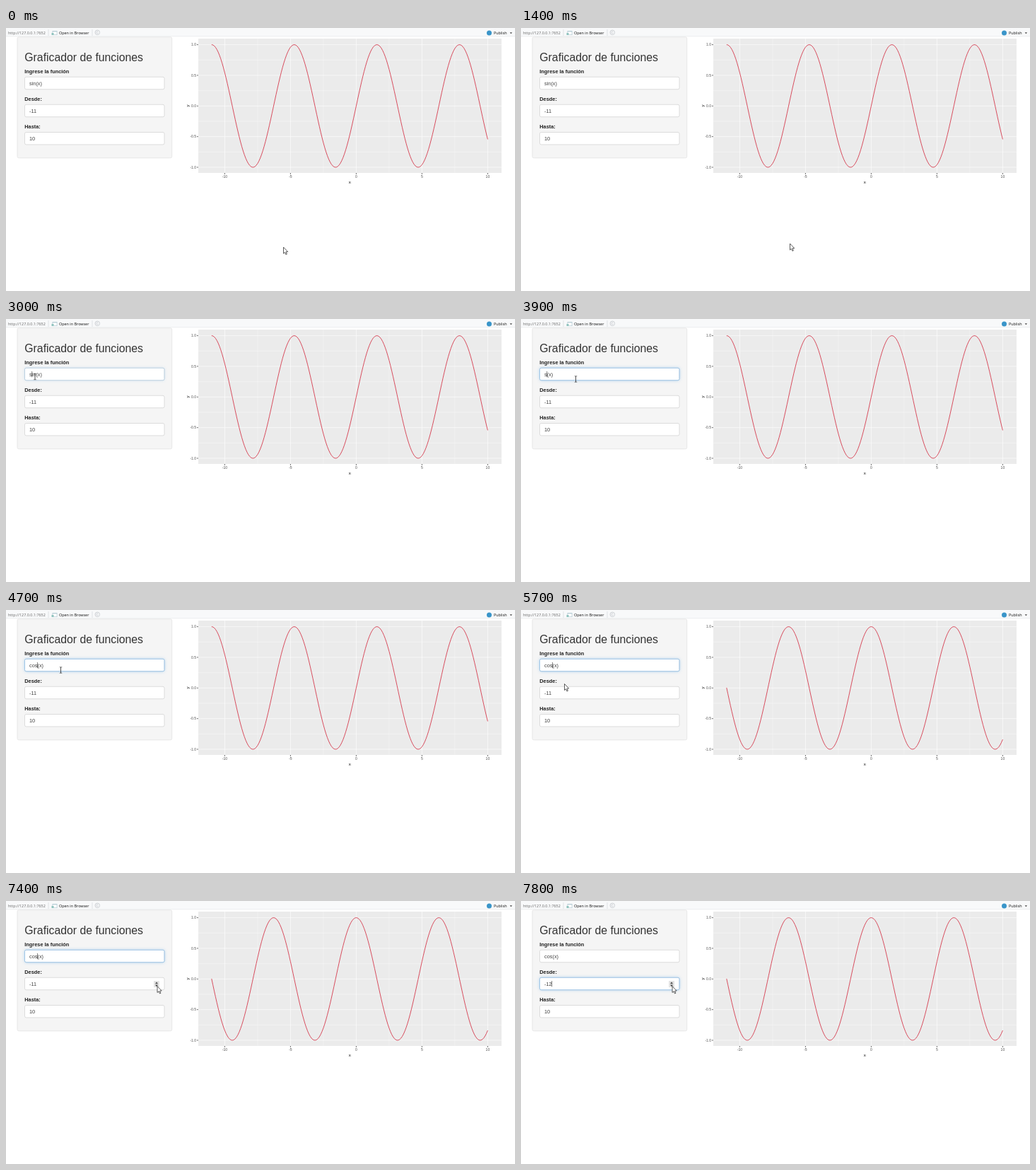
An HTML page with a canvas that plays this animation: 720 by 372 pixels, repeating every 8 s.

```html
<!DOCTYPE html>
<html lang="es">
<head>
<meta charset="utf-8">
<title>Graficador de funciones</title>
<style>
html, body { margin: 0; width: 100%; height: 100%; overflow: hidden; background: #fff; }
canvas { display: block; }
</style>
</head>
<body>
<canvas id="stage" width="720" height="372"></canvas>
<script>
const c = document.getElementById('stage').getContext('2d');
const LOOP = 8000, STEP = 100, BLINK = 530;
const ARIAL = '"Liberation Sans", Arial, sans-serif';
const UI = '"Open Sans", "Noto Sans", sans-serif';
const FIELDS = [69, 108, 147.2], BOX = { x: 26.5, w: 197.5, h: 18 };

// time, formula, caret index
const typing = [
  [0, 'sin(x)', 0], [2870, 'sin(x)', 1], [3880, 's(x)', 1],
  [3980, '(x)', 0], [4080, 'c(x)', 1], [4210, 'cos(x)', 3]
];
// time, x, y, ease-out power for the way here (smooth if none)
const path = [
  [0, 392.5, 310], [1300, 392.5, 310], [2100, 113, 193], [2200, 105.5, 187, 1],
  [2700, 41, 81.5, 2.5], [3200, 41, 81.5], [3400, 77.5, 85], [5600, 77.5, 85],
  [5700, 61.5, 104.5], [5800, 56, 124], [6000, 56, 124], [6400, 58, 124],
  [6500, 58, 124], [7400, 214, 120.5], [LOOP, 214, 120.5]
];

const clamp = v => Math.max(0, Math.min(1, v));
const mix = (a, b, p) => a + (b - a) * p;

function rect(x, y, w, h, color) {
  c.fillStyle = color;
  c.fillRect(x, y, w, h);
}
function line(x1, y1, x2, y2, color, width) {
  c.strokeStyle = color;
  c.lineWidth = width;
  c.beginPath();
  c.moveTo(x1, y1);
  c.lineTo(x2, y2);
  c.stroke();
}
function shape(points, color) {
  c.beginPath();
  points.forEach(([x, y]) => c.lineTo(x, y));
  c.closePath();
  c.fillStyle = color;
  c.fill();
}
function disc(x, y, r, color) {
  c.beginPath();
  c.arc(x, y, r, 0, 7);
  c.fillStyle = color;
  c.fill();
}
function text(str, x, y, font, color, align = 'left') {
  c.font = font;
  c.fillStyle = color;
  c.textAlign = align;
  c.fillText(str, x, y);
}

function toolbar() {
  const font = '5.45px ' + UI;
  rect(0, 0, 720, 12, '#f8f9fa');
  rect(0, 11.5, 720, 0.7, '#e8eaec');
  text('http://127.0.0.1:7652', 3, 8.7, font, '#666');
  text('Open in Browser', 75, 9.3, font, '#111');
  text('Publish', 690, 9.3, font, '#111');
  for (const x of [60, 122]) line(x, 2, x, 11, '#d5d8db', 0.7);
  rect(65.5, 4, 7, 6, '#b5ccd4');
  rect(66.3, 5.3, 5.4, 4, '#fff');
  rect(64.5, 7, 3, 3, '#8fc3bd');
  c.beginPath();
  c.arc(129.3, 6.3, 3.3, 0, 7);
  c.strokeStyle = '#c3c7cc';
  c.lineWidth = 0.8;
  c.stroke();
  c.beginPath();
  c.arc(129.3, 6.3, 1.5, 0.5, 5.5);
  c.stroke();
  disc(683.5, 7, 3.5, '#3a95c9');
  shape([[712.7, 6.3], [716, 6.3], [714.35, 8.2]], '#444');
}

function plot(f) {
  const px = x => 495.4 + 18.6 * x, py = y => 110.3 - 86.7 * y;
  const L = 272, R = 701, T = 15, B = 205, font = '5px ' + ARIAL;
  rect(L, T, R - L, B - T, '#ebebeb');
  for (let x = -10; x <= 10; x += 2.5) {
    const major = x % 5 === 0;
    line(px(x), T, px(x), B, '#fff', major ? 0.6 : 0.35);
    if (!major) continue;
    line(px(x), B, px(x), B + 2, '#333', 0.7);
    text(x, px(x), 212.3, font, '#4d4d4d', 'center');
  }
  for (let y = -1; y <= 1; y += 0.25) {
    const major = y % 0.5 === 0;
    line(L, py(y), R, py(y), '#fff', major ? 0.6 : 0.35);
    if (!major) continue;
    line(L - 2, py(y), L, py(y), '#333', 0.7);
    text(y.toFixed(1), 269, py(y) + 1.8, font, '#4d4d4d', 'right');
  }
  text('x', 486.3, 219.8, '6.2px ' + ARIAL, '#111', 'center');
  c.save();
  c.translate(258.5, 110);
  c.rotate(-Math.PI / 2);
  text('y', 0, 0, '6.2px ' + ARIAL, '#111', 'center');
  c.restore();
  c.beginPath();
  for (let i = 0; i <= 210; i++) c.lineTo(px(-11 + i / 10), py(f(-11 + i / 10)));
  c.strokeStyle = '#d0182f';
  c.lineWidth = 0.75;
  c.stroke();
}

function field(i, label, value, glow, caret) {
  const y = FIELDS[i], font = '7.36px ' + ARIAL;
  text(label, 26.3, y - 5.3, 'bold ' + font, '#222');
  c.beginPath();
  c.roundRect(BOX.x, y + 0.3, BOX.w, BOX.h - 0.6, 2.1);
  c.save();
  c.shadowColor = `rgba(102,175,233,${0.55 * glow})`;
  c.shadowBlur = 4;
  c.fillStyle = '#fff';
  c.fill();
  c.restore();
  c.lineWidth = 0.6;
  c.strokeStyle = '#c8c8c8';
  c.stroke();
  c.globalAlpha = glow;
  c.strokeStyle = '#7dbbee';
  c.stroke();
  c.globalAlpha = 1;
  text(value, 33, y + 11.7, font, '#444');
  if (caret >= 0) {
    const x = 33 + c.measureText(value.slice(0, caret)).width;
    line(x, y + 5, x, y + 13.3, '#222', 0.6);
  }
}

function spinner(hot) {
  rect(209, 113, 8, 9, hot ? '#e4e4e4' : '#f0f0f0');
  shape([[211, 117], [215, 117], [213, 114.6]], '#444');
  shape([[211, 118.6], [215, 118.6], [213, 121]], '#444');
}

function pointerAt(t) {
  const k = path.findIndex(p => p[0] > t);
  const a = path[k - 1], b = path[k], p = (t - a[0]) / (b[0] - a[0]);
  const e = b[3] ? 1 - (1 - p) ** b[3] : p * p * (3 - 2 * p);
  return [mix(a[1], b[1], e), mix(a[2], b[2], e)];
}

function arrow(x, y) {
  c.save();
  c.translate(x, y);
  shape([[0, 0], [0, 9], [2, 7.2], [3.4, 10.4], [4.9, 9.8], [3.5, 6.7], [6.2, 6.5]], '#fff');
  c.strokeStyle = '#333';
  c.lineWidth = 0.8;
  c.stroke();
  c.restore();
}
function beam(x, y) {
  line(x, y - 4, x, y + 4, '#222', 0.8);
  for (const s of [-4.2, 4.2]) line(x - 1.8, y + s, x + 1.8, y + s, '#222', 0.6);
}

function draw(t) {
  const [at, formula, index] = typing.findLast(k => k[0] <= t);
  const caretOn = at > 0 && t < 7700 && Math.floor((t - at) / BLINK) % 2 === 0;
  const stepped = t >= 7700, focus = clamp((t - 7600) / 200);
  const [x, y] = pointerAt(t);
  const over = FIELDS.findIndex(f => x > BOX.x && x < BOX.x + BOX.w && y > f && y < f + BOX.h);
  const hot = over === 1 && x > 208;

  rect(0, 0, 720, 372, '#fff');
  toolbar();
  c.beginPath();
  c.roundRect(16, 12.8, 218.7, 171, 2.1);
  c.fillStyle = '#f5f5f5';
  c.fill();
  c.strokeStyle = '#e0e0e0';
  c.lineWidth = 0.7;
  c.stroke();
  text('Graficador de funciones', 26.3, 47.1, '15.8px ' + ARIAL, '#333');
  field(0, 'Ingrese la función', formula, clamp((t - 2900) / 200) * (1 - focus), caretOn ? index : -1);
  field(1, 'Desde:', stepped ? '-12' : '-11', focus, stepped ? 3 : -1);
  field(2, 'Hasta:', '10', 0, -1);
  if (over === 1) spinner(hot);
  plot(t < 4800 ? Math.sin : Math.cos);
  if (over >= 0 && !hot) beam(x, y);
  else arrow(x, y);
}

const start = performance.now();
function tick() {
  const t = (performance.now() - start) % LOOP;
  draw(Math.floor(t / STEP) * STEP);
  requestAnimationFrame(tick);
}
tick();
</script>
</body>
</html>
```
